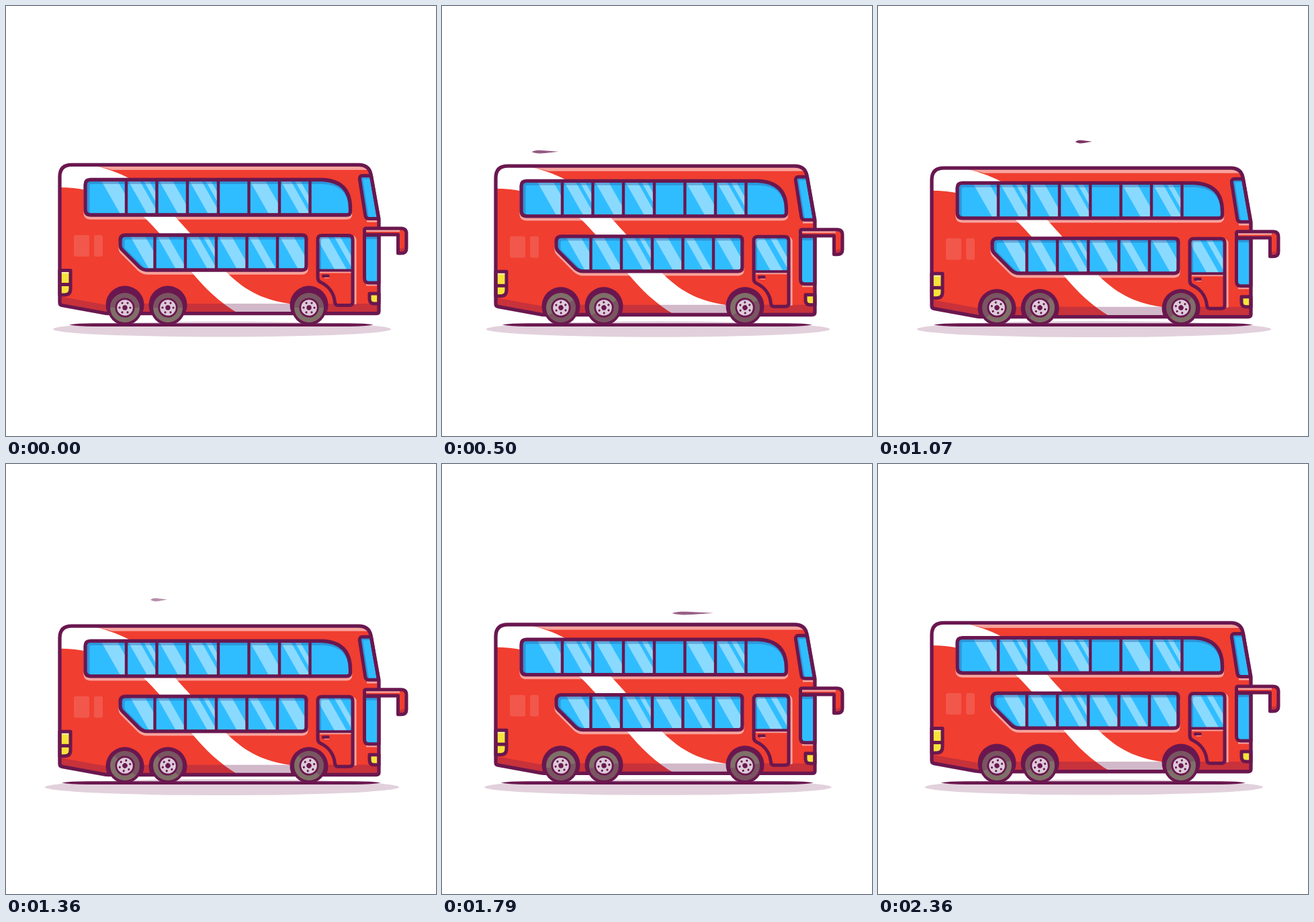
Animation, 640 px wide and 640 px high, one loop 2430 ms. Source, as an HTML page with a canvas:

```html
<!DOCTYPE html>
<html lang="en">
<head>
<meta charset="utf-8">
<title>Double-decker bus</title>
<style>
html, body { margin: 0; width: 100%; height: 100%; overflow: hidden; background: #fff; }
canvas { display: block; width: 100vw; height: 100vh; }
</style>
</head>
<body>
<canvas id="stage"></canvas>
<script>
const LOOP = 2430;
const INK = '#6a174f', RED = '#f03e30', GLASS = '#30bdff', SHINE = '#8adaff',
      YELLOW = '#f5e43c', TIRE = '#7f7068', HUB = '#dccbd8';
const SHADE = 'rgba(106,23,79,.3)', GLOW = 'rgba(255,255,255,.52)', DIM = 'rgba(38,90,165,.4)';
const AXLES = [177, 241, 451];

const canvas = document.getElementById('stage');
const ctx = canvas.getContext('2d');
const path = d => new Path2D(d);

const shape = {
  body: path('M80 254Q80 236.3 98 236.3H525Q540 236.3 543 250L555 317V454Q555 457.7 551 457.7H152Q149 457.7 146 457L83 445.5Q80 445 80 441Z'),
  stripe: path('M78 234H106C160 239 203 262 236 297C278 341 301 370 330 398C358 425 385 439 430 444V462H354C321 445 297 421 277 397C255 371 228 335 205 314C180 291 135 270 78 270Z'),
  low: path('M78 432L150 445V443H560V462H78Z'),
  upper: path('M126 258.5H470Q512.5 260 512.5 301V306Q512.5 311 507 311H126Q118 311 118 303V266Q118 258.5 126 258.5Z'),
  lower: path('M178 341H441Q447 341 447 347V387Q447 393 441 393H210Q203 393 198 388L173 363Q170 360 170 356V349Q170 341 178 341Z'),
  door: path('M470 341.5H510Q516 341.5 516 347.5V441Q516 445.5 511 445.5H494Q490 445.5 489.5 441C488 426 479 416 468 411Q464 409 464 404V347.5Q464 341.5 470 341.5Z'),
  doorGlass: path('M470 341.5H510Q516 341.5 516 347.5V393H464V347.5Q464 341.5 470 341.5Z'),
  screen: path('M531 252.5H543.5L554.5 316.5H540Q535.5 316.5 534.8 312L526.4 258Q525.8 252.5 531 252.5Z'),
  pane: path('M533.5 341H555V412H540Q533.5 412 533.5 405Z'),
  mirror: path('M536 331H588Q596 331 596 339V361Q596 368 588 368H583.5V340.2H536Q533.5 340.2 533.5 337V333.5Q533.5 331 536 331Z'),
  tail: path('M80 393.5H96V421Q96 430 87 430H80Z'),
  lamp: path('M541 428H555V443H548Q541 443 541 436Z')
};

function fill(p, color) {
  ctx.fillStyle = color;
  ctx.fill(p);
}

function stroke(p, width = 5.3, color = INK) {
  ctx.lineWidth = width;
  ctx.strokeStyle = color;
  ctx.stroke(p);
}

function rect(x, y, w, h, color, r = 0) {
  ctx.fillStyle = color;
  ctx.beginPath();
  ctx.roundRect(x, y, w, h, r);
  ctx.fill();
}

function disc(x, y, r, color, from = 0, to = Math.PI * 2) {
  ctx.fillStyle = color;
  ctx.beginPath();
  ctx.arc(x, y, r, from, to);
  ctx.fill();
}

function clipped(p, draw) {
  ctx.save();
  ctx.clip(p);
  draw();
  ctx.restore();
}

function shifted(x, y, draw) {
  ctx.save();
  ctx.translate(x, y);
  draw();
  ctx.restore();
}

// Slanted reflection: left edge and width at the top
function gleam(x, y, w, h) {
  fill(path(`M${x} ${y}h${w}l${h * .57} ${h}h${-w}z`), SHINE);
}

function innerShade(p, width) {
  clipped(p, () => shifted(2, 2, () => stroke(p, width, DIM)));
}

function windows(p, top, bottom, bars, gleams) {
  shifted(0, 4, () => stroke(p, 5.3, GLOW));
  fill(p, GLASS);
  clipped(p, () => {
    const edges = [0, ...bars, 640];
    for (const [pane, x, w] of gleams) {
      clipped(path(`M${edges[pane]} 0H${edges[pane + 1]}V640H${edges[pane]}Z`),
        () => gleam(x, top, w, bottom - top));
    }
  });
  innerShade(p, 9);
  for (const x of bars) stroke(path(`M${x} ${top}V${bottom}`), 4.4);
  stroke(p);
}

function drawDoor() {
  stroke(path('M514 343Q520 343 520 349V444'), 3.2, GLOW);
  fill(shape.door, RED);
  fill(shape.doorGlass, GLASS);
  clipped(shape.doorGlass, () => {
    gleam(460, 341, 18, 52);
    gleam(487, 341, 9, 52);
  });
  innerShade(shape.doorGlass, 6);
  rect(467, 394, 47, 3.5, GLOW);
  stroke(path('M464 393.5H516'), 4);
  stroke(shape.door, 5);
  rect(470, 399.5, 11.5, 4.5, INK, 1.5);
  rect(474, 404, 7, 1.2, GLOW);
}

function drawFront() {
  stroke(path('M537 320H552'), 3.5, GLOW);
  fill(shape.screen, GLASS);
  innerShade(shape.screen, 6);
  stroke(shape.screen, 5);

  stroke(path('M536 415H552'), 3, GLOW);
  fill(shape.pane, GLASS);
  clipped(shape.pane, () => rect(533, 341, 22, 6, DIM));
  stroke(shape.pane, 5);

  fill(shape.lamp, YELLOW);
  stroke(shape.lamp, 5);
}

function drawMirror() {
  fill(shape.mirror, RED);
  clipped(shape.mirror, () => {
    rect(536, 333, 50, 3, GLOW);
    fill(path('M583 361H589Q593 361 593 355V341H597V369H583Z'), SHADE);
  });
  stroke(shape.mirror, 5);
}

function drawBody() {
  fill(shape.body, RED);
  clipped(shape.body, () => {
    fill(shape.stripe, '#fff');
    fill(shape.low, SHADE);
    fill(path('M125 238H546V244H158Q146 240 125 238Z'), GLOW);
    rect(101, 341, 23, 32, '#f2574b', 3);
    rect(131, 341, 13, 32, '#f2574b', 3);
  });
  for (const x of AXLES) disc(x, 445, 28.5, INK, Math.PI - .53, Math.PI * 2 + .53);

  windows(shape.upper, 258.5, 311, [179, 224.5, 270, 316, 361.5, 407, 452.5], [
    [0, 141, 24], [1, 181, 17], [1, 204, 8], [2, 227, 20],
    [3, 272, 18], [3, 296, 8], [5, 362, 23], [6, 408, 15], [6, 429, 8]
  ]);
  windows(shape.lower, 341, 393, [221.5, 267, 313, 358.5, 404], [
    [0, 184, 22], [1, 224, 16], [2, 271, 14], [2, 292, 7],
    [3, 315, 20], [4, 360, 13], [5, 406, 21]
  ]);
  drawDoor();
  drawFront();

  rect(82, 395, 12, 33, YELLOW);
  rect(82, 395, 12, 3, '#fff3b0');
  stroke(path('M80 414.5H96'), 5);
  stroke(shape.tail, 5);

  stroke(shape.body);
  drawMirror();
}

function drawWheel(x, angle) {
  shifted(x, 449, () => {
    disc(0, 0, 26, INK);
    disc(0, 0, 22, TIRE);
    ctx.rotate(angle);
    disc(0, 0, 22, SHADE, Math.PI, Math.PI * 2);
    disc(0, 0, 14.6, INK);
    disc(0, 0, 11.8, HUB);
    disc(0, 0, 3.7, INK);
    for (let i = 0; i < 6; i++) {
      const a = i * Math.PI / 3;
      disc(8 * Math.cos(a), 8 * Math.sin(a), 1.6, INK);
    }
  });
}

function drawGround(scale) {
  shifted(321.5, 481, () => {
    ctx.scale(scale, scale);
    ctx.fillStyle = '#e2d1dc';
    ctx.beginPath();
    ctx.ellipse(0, 0, 251.5, 11.5, 0, 0, Math.PI * 2);
    ctx.fill();
  });
  shifted(320.3, 474.6, () => {
    ctx.scale(scale, 1);
    fill(path('M-226.5 0Q-215 -2.3 -190 -2.3H190Q215 -2.3 226.5 0Q215 2.3 190 2.3H-190Q-215 2.3 -226.5 0Z'), INK);
  });
}

const streaks = [
  { start: 100, x: 203, y: 217, width: 40, travel: 175 },
  { start: 790, x: 332, y: 202, width: 25, travel: 175 },
  { start: 1370, x: 426, y: 222, width: 62, travel: 195 }
];

function drawStreak({ start, x, y, width: w, travel }, t) {
  const u = (t - start) / 930;
  if (u <= 0 || u >= 1) return;
  const eased = u * u * (3 - 2 * u);
  shifted(x - travel * eased, y, () => {
    ctx.globalAlpha = Math.min(1, u / .15, 1.25 * (1 - u));
    fill(path(`M0 0C${w * .12} -2.6 ${w * .28} -2.6 ${w * .42} -2L${w} -.2L${w * .5} 2C${w * .3} 2.8 ${w * .1} 2.6 0 0Z`), INK);
  });
}

function draw(t) {
  const size = Math.round(innerWidth * devicePixelRatio);
  if (canvas.width !== size) canvas.width = canvas.height = size;
  ctx.setTransform(size / 640, 0, 0, size / 640, 0, 0);
  ctx.lineJoin = 'round';
  ctx.fillStyle = '#fff';
  ctx.fillRect(0, 0, 640, 640);

  const phase = t / LOOP * Math.PI * 2;
  const bob = (1 - Math.cos(phase)) / 2;
  drawGround(1 + .05 * bob);
  for (const s of streaks) drawStreak(s, t);
  shifted(0, 5 * bob, drawBody);
  for (const x of AXLES) drawWheel(x, phase * 2);
}

function tick() {
  draw(performance.now() % LOOP);
  requestAnimationFrame(tick);
}
tick();
</script>
</body>
</html>
```
